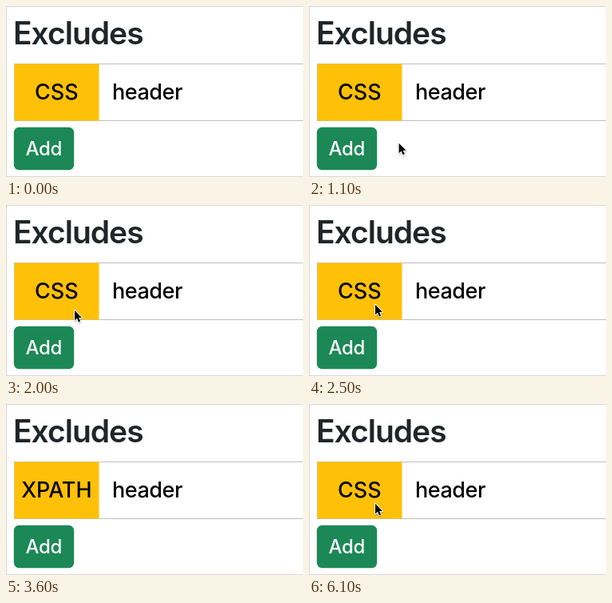
An HTML page with a canvas for the animation above (6.51 s loop, 372 px wide and 214 px high).

```html
<!DOCTYPE html>
<html lang="en">
<head>
<meta charset="utf-8">
<title>Excludes</title>
<style>
html, body { margin: 0; width: 100%; height: 100%; overflow: hidden; background: #fff; }
canvas { display: block; width: 372px; height: 214px; }
</style>
</head>
<body>
<canvas id="stage" width="372" height="214"></canvas>
<script>
const ctx = document.getElementById('stage').getContext('2d');
const LOOP = 6510;
const STEP = 100;
const arrow = new Path2D('M0 0V12.6L2.9 9.9 5 14.6 7.2 13.7 5.1 9.1H9Z');

const between = (t, start, end) => t >= start && t < end;
const mix = (a, b, k) => a + (b - a) * k;
const easeOut = (k, power) => 1 - (1 - k) ** power;

function rect(x, y, w, h, color) {
  ctx.fillStyle = color;
  ctx.fillRect(x, y, w, h);
}

function label(text, x, y, size, color, { weight = 450, spacing = 0, align = 'left' } = {}) {
  ctx.font = `${weight} ${size}px Inter, Roboto, sans-serif`;
  ctx.letterSpacing = spacing + 'px';
  ctx.textAlign = align;
  ctx.fillStyle = color;
  ctx.fillText(text, x, y);
}

// Sweep in from the lower right, then drift up onto the selector.
function pointerAt(t) {
  if (t < 1300) {
    const k = (t - 700) / 600;
    return [mix(207, 93, easeOut(k, 1.6)), mix(205, 155, k)];
  }
  const k = Math.min((t - 1300) / 1000, 1);
  return [mix(93, 83, k), mix(155, 124.8, easeOut(k, 1.2))];
}

function drawPointer(x, y) {
  ctx.save();
  ctx.translate(x, y);
  ctx.lineJoin = 'round';
  ctx.lineWidth = 2;
  ctx.strokeStyle = '#fff';
  ctx.shadowColor = 'rgba(0,0,0,0.3)';
  ctx.shadowBlur = 2;
  ctx.shadowOffsetY = 1;
  ctx.stroke(arrow);
  ctx.shadowColor = 'transparent';
  ctx.fillStyle = '#000';
  ctx.fill(arrow);
  ctx.restore();
}

function draw(t) {
  rect(0, 0, 372, 214, '#d9d9d9');
  rect(1, 1, 371, 212, '#fff');
  label('Excludes', 9, 48, 39, '#212529', { weight: 600, spacing: -1 });

  // Selector row
  rect(10, 72, 362, 72, '#bfbfbf');
  rect(11, 73, 361, 70, '#fff');
  rect(10.5, 72.5, 106, 71, '#ffc107');
  const mode = between(t, 3200, 6000) ? 'XPATH' : 'CSS';
  label(mode, 63.3, 117, 27, '#000', { spacing: -0.1, align: 'center' });
  label('header', 133, 117, 27, '#000', { spacing: -0.45 });

  // Button
  ctx.fillStyle = '#1b8856';
  ctx.beginPath();
  ctx.roundRect(9.8, 151.8, 75.4, 53.4, 6.5);
  ctx.fill();
  label('Add', 47.2, 187, 24, '#fff', { spacing: -0.4, align: 'center' });

  if (t >= 700 && !between(t, 3600, 3700)) drawPointer(...pointerAt(t));
}

function frame() {
  const t = performance.now() % LOOP;
  draw(Math.floor(t / STEP) * STEP);
  requestAnimationFrame(frame);
}
frame();
</script>
</body>
</html>
```
